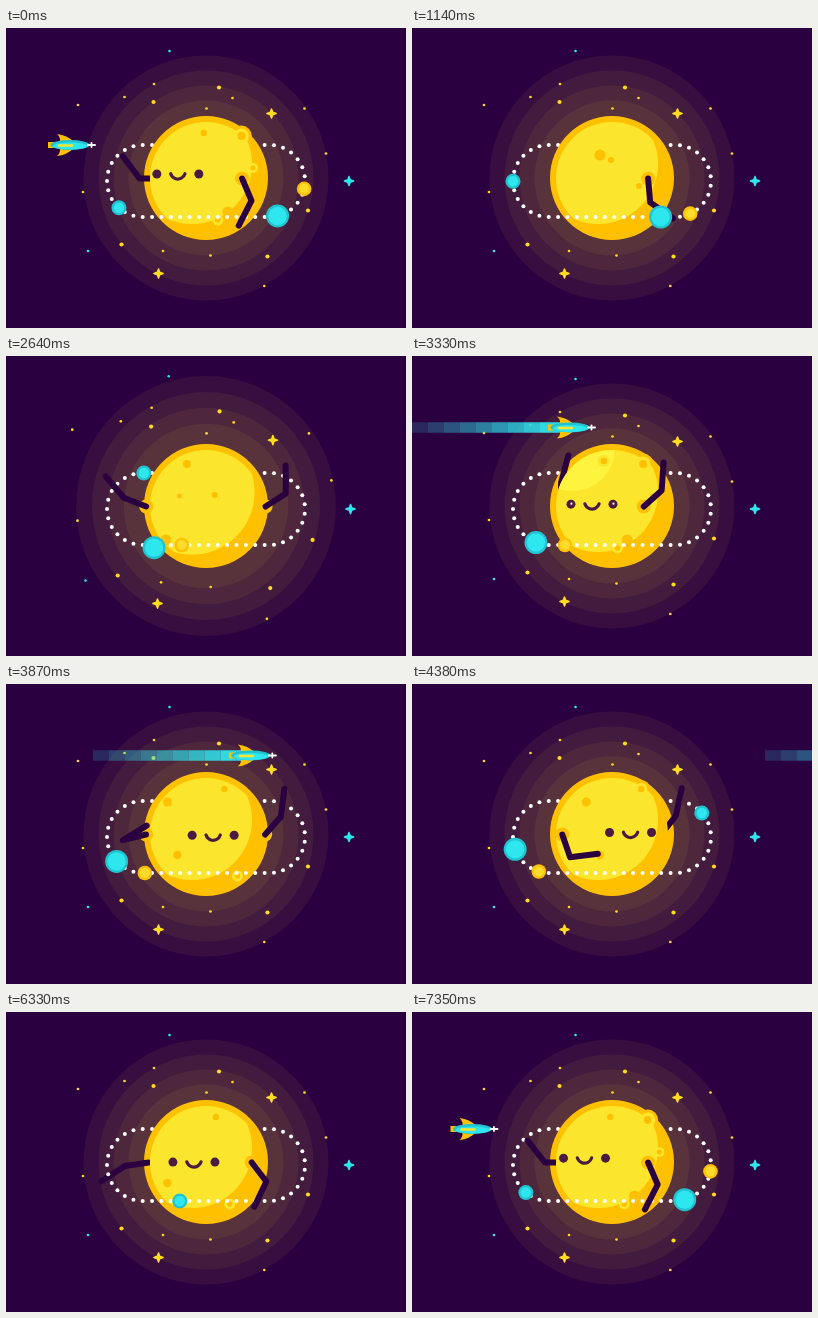
These frames come from a looping animation (400x300 px, 7380 ms). An HTML page with a canvas:

```html
<!DOCTYPE html>
<html>
<head>
<meta charset="utf-8">
<style>
html, body { margin: 0; height: 100%; overflow: hidden; background: #2b0040; }
canvas { display: block; }
</style>
</head>
<body>
<canvas id="stage" width="400" height="300"></canvas>
<script>
const g = document.getElementById('stage').getContext('2d');
const LOOP = 7380, TAU = Math.PI * 2, RAD = Math.PI / 180;
const NIGHT = '#2b0040', GOLD = '#ffc000', LEMON = '#fce62d', CYAN = '#2ee6ee', TEAL = '#22c3d0', INK = '#4b1c3f';
const BEATS = [0, 1140, 2070, 3330, 4380, 5310];

// Smooth monotone curve through [time, value] pairs
function curve(keys, t) {
  const n = keys.length;
  if (t <= keys[0][0]) return keys[0][1];
  if (t >= keys[n - 1][0]) return keys[n - 1][1];
  let i = 0;
  while (t >= keys[i + 1][0]) i++;
  const slope = j => (keys[j + 1][1] - keys[j][1]) / (keys[j + 1][0] - keys[j][0]);
  const tangent = j => {
    if (j === 0) return slope(0);
    if (j === n - 1) return slope(n - 2);
    const a = slope(j - 1), b = slope(j);
    return a * b > 0 ? 2 * a * b / (a + b) : 0;
  };
  const h = keys[i + 1][0] - keys[i][0], x = (t - keys[i][0]) / h;
  const a = keys[i][1], b = keys[i + 1][1];
  return a + (b - a) * x * x * (3 - 2 * x) + h * x * (1 - x) * (tangent(i) * (1 - x) - tangent(i + 1) * x);
}

// Cyclic version on the shared beats; gain is the growth over one loop
function beat(values, t, gain = 0) {
  const keys = values.map((v, i) => [BEATS[i], v]);
  keys.unshift([BEATS[5] - LOOP, values[5] - gain]);
  keys.push([LOOP, values[0] + gain], [LOOP + BEATS[1], values[1] + gain]);
  return curve(keys, t);
}

function disc(x, y, r, color) {
  g.fillStyle = color;
  g.beginPath();
  g.arc(x, y, r, 0, TAU);
  g.fill();
}

function line(points, width, color) {
  g.strokeStyle = color;
  g.lineWidth = width;
  g.lineCap = g.lineJoin = 'round';
  g.beginPath();
  points.forEach(p => g.lineTo(...p));
  g.stroke();
}

// The first five stars are the large ones
const STARS = [
  [115.5, 216.5], [147.5, 74], [213, 59.5], [302, 182.5], [261.5, 228.5],
  [72, 77], [118.5, 69], [148, 56], [226.5, 70], [200.5, 80.5], [298.5, 80.5],
  [320, 125.5], [258.3, 258], [204.5, 227.5], [157, 223], [77, 164]
];

function sparkle(x, y, color) {
  g.fillStyle = g.strokeStyle = color;
  g.lineWidth = 1.5;
  g.lineJoin = 'round';
  g.beginPath();
  for (let i = 0; i < 8; i++) {
    const r = i % 2 ? 1.7 : 4.6, a = i * TAU / 8;
    g.lineTo(x + r * Math.cos(a), y + r * Math.sin(a));
  }
  g.closePath();
  g.fill();
  g.stroke();
}

function sky(pulse) {
  g.fillStyle = NIGHT;
  g.fillRect(0, 0, 400, 300);
  for (let i = 0; i < 4; i++) disc(200, 150, (122.5 - 15 * i) * (1 + .115 * pulse), 'rgba(250,225,60,.06)');
  const spread = (x, y, k) => [200 + (x - 200) * (1 + k * pulse), 150 + (y - 150) * (1 + k * pulse)];
  STARS.forEach(([x, y], i) => disc(...spread(x, y, .085), i < 5 ? 2.1 : 1.35, '#ffd91f'));
  disc(...spread(163.5, 23, .04), 1.3, CYAN);
  disc(...spread(82, 223, .04), 1.3, CYAN);
  sparkle(...spread(265.5, 85.5, .04), '#ffdc1f');
  sparkle(...spread(152.5, 245.5, .04), '#ffdc1f');
  sparkle(...spread(343, 153, .02), CYAN);
}

// Orbit: a stadium, measured clockwise from its leftmost point
const R = 36, FLAT = 126, ARC = Math.PI * R, ROUND = 2 * (FLAT + ARC), COUNT = 51;
function orbit(s) {
  s = ((s % ROUND) + ROUND) % ROUND;
  const bend = (cx, a) => [cx + R * Math.cos(a), 153 + R * Math.sin(a)];
  if (s < ARC / 2) return bend(137, Math.PI + s / R);
  s -= ARC / 2;
  if (s < FLAT) return [137 + s, 117];
  s -= FLAT;
  if (s < ARC) return bend(263, s / R - Math.PI / 2);
  s -= ARC;
  if (s < FLAT) return [263 - s, 189];
  return bend(137, Math.PI / 2 + (s - FLAT) / R);
}

function orbitDots(front) {
  for (let i = 0; i < COUNT; i++) {
    const [x, y] = orbit(i * ROUND / COUNT);
    if (y > 153 === front) disc(x, y, 2, '#fff');
  }
}

const PLANETS = [
  { at: [247, 280, 357.6, 405.6, 432, 456], r: 7.3, rim: GOLD, fill: '#ffdc2b', sag: 0 },
  { at: [448, 478, 503, 590, 691, 780], r: 7.5, rim: TEAL, fill: CYAN, sag: 0 },
  { at: [287, 310, 384.6, 435, 465.6, 493.5], r: 11.5, rim: TEAL, fill: CYAN, sag: 5 }
];

function planet(p, t, front, pulse) {
  let [x, y] = orbit(beat(p.at, t, ROUND));
  if (y > 150 !== front) return;
  if (front) y += p.sag * pulse;
  disc(x, y, p.r, p.rim);
  disc(x, y, p.r - 2.3, p.fill);
}

// Rocket: one trip round the orbit, then a dash across the sky
const TURN = 173 + ARC;
function lap(u) {
  if (u < 173) return [90 + u, 117];
  if (u < TURN) return orbit(ARC / 2 + FLAT + u - 173);
  return [263 - (u - TURN), 188.5];
}
const dash = u => [u, 71.5];
const LAP = [[-880, -95], [0, 0], [1140, 150], [2070, 505], [2750, 800]];
const DASH = [[3000, -20], [3330, 184], [3780, 245], [4380, 537], [4620, 660]];

function trail(path, u, front, alpha) {
  for (let i = 0; i < 10; i++) {
    const far = u - 24 - (i + 1) * 16, a = alpha(i);
    if (a <= 0 || path === lap && far + 16 > 229 !== front) continue;
    g.globalAlpha = a;
    g.strokeStyle = '#2fdde6';
    g.lineWidth = 10.5;
    g.lineCap = 'butt';
    g.beginPath();
    for (let j = 0; j <= 4; j++) g.lineTo(...path(far + j * 4));
    g.stroke();
  }
  g.globalAlpha = 1;
}

function rocket(path, u) {
  const [x, y] = path(u), [bx, by] = path(u - 24);
  g.save();
  g.translate(x, y);
  g.rotate(Math.atan2(y - by, x - bx));
  g.fillStyle = GOLD;
  g.fillRect(-48, -3, 6, 6);
  for (const side of [-1, 1]) {
    g.beginPath();
    g.moveTo(-39, side * 11);
    g.quadraticCurveTo(-29, side * 10, -22, side * 3);
    g.lineTo(-37, 0);
    g.quadraticCurveTo(-34, side * 7, -39, side * 11);
    g.fill();
  }
  g.beginPath();
  g.fillStyle = TEAL;
  g.ellipse(-26, 0, 19.5, 5, 0, 0, TAU);
  g.fill();
  g.beginPath();
  g.fillStyle = CYAN;
  g.ellipse(-26, 1, 17, 3.5, 0, 0, TAU);
  g.fill();
  line([[-37, .5], [-24, .5]], 2.6, LEMON);
  line([[-8, 0], [-1, 0]], 2, '#fff');
  line([[-4.5, -2], [-4.5, 2]], 1.8, '#fff');
  g.restore();
}

function flight(t, front) {
  const time = t > 6000 ? t - LOOP : t;
  if (time < 2800) {
    const u = curve(LAP, time), power = Math.min(1, Math.max(0, (time - 1200) / 400));
    trail(lap, u, front, i => power * Math.min(.85, (8.5 - i) * .9));
    if (u - 20 > 229 === front) rocket(lap, u);
  } else if (front && time > 2990 && time < 4640) {
    const u = curve(DASH, time);
    trail(dash, u, true, i => Math.min(1, 1.08 - i * .1));
    rocket(dash, u);
  }
}

// Surface marks: longitude, height, pit radius; bumps have a bright mound round the pit
const CRATERS = [[-47, 118, 4.5], [53, 184, 5.5], [168, 127, 5.5], [179, 132, 3], [206, 158, 3], [112, 139, 3]];
const BUMPS = [[-30, 171, 4.2], [25, 105, 3.2], [79, 108, 4], [78, 140, 2.5], [43, 192, 2.8]];

function marks(list, yaw, paint) {
  for (const [lon, y, r] of list) {
    const a = (lon + yaw) * RAD;
    if (Math.cos(a) > .55) paint(200 + Math.sqrt(62 * 62 - (y - 150) ** 2) * Math.sin(a), y, r);
  }
}

function face(t) {
  const turn = beat([-28, -180, -152, -19.5, 18, 0], t), a = turn * RAD;
  if (Math.cos(a) < 0) return;
  g.save();
  g.beginPath();
  g.arc(200, 150, 62, 0, TAU);
  g.clip();
  g.translate(200 + 60 * Math.sin(a), 153 - .25 * Math.abs(turn));
  g.scale(Math.min(1, Math.cos(a) / .8), 1);
  for (const dx of [-21, 21]) {
    disc(dx, 0, 4.5, INK);
    if (t > 2800 && t < 3800) disc(dx + .5, -.5, 1.1, '#fff');
  }
  g.strokeStyle = INK;
  g.lineWidth = 3.2;
  g.lineCap = 'round';
  g.beginPath();
  g.arc(0, -2.5, 7.5, .3, Math.PI - .3);
  g.stroke();
  g.restore();
}

// Arms: longitude of the shoulder, then directions of upper and lower arm, in degrees
const ARMS = [
  { shoulder: [-135, -165, -58, -122, -56, -80], upper: [180, 180, 150, 270, 71, 152], lower: [233, 270, 204, 285, 353, 86] },
  { shoulder: [37, 37, 122, 32, 125, 76], upper: [67, 85, -20, -42, -52, 32], lower: [117, 35, -92, -86, -78, 111] }
];

function arm({ shoulder, upper, lower }, t, front) {
  const lon = beat(shoulder, t) * RAD;
  if (Math.cos(lon) > 0 !== front) return;
  const reach = ([x, y], length, angles) => {
    const a = beat(angles, t) * RAD;
    return [x + length * Math.cos(a), y + length * Math.sin(a)];
  };
  const root = [200 + 60 * Math.sin(lon), 150.5];
  const elbow = reach(root, 24, upper);
  if (front) disc(...root, 7, GOLD);
  line([root, elbow, reach(elbow, 28, lower)], 6, NIGHT);
}

function sun(t, pulse) {
  const yaw = beat([-28, -180, -152, -36, 18, 0], t);
  disc(200, 150, 62, GOLD);
  for (const a of ARMS) arm(a, t, false);
  marks(BUMPS, yaw, (x, y, r) => disc(x, y, r * 1.6 + 4, GOLD));
  disc(200, 150, 56, GOLD);

  g.save();
  g.beginPath();
  g.arc(200, 150, 56, 0, TAU);
  g.clip();
  disc(186, 136, 60 + 5 * pulse, LEMON);
  const shine = Math.max(0, 1 - ((t - 3330) / 420) ** 2);
  disc(160, 92, 43, `rgba(255,250,70,${.7 * shine})`);
  g.restore();

  marks(BUMPS, yaw, (x, y, r) => disc(x, y, r * 1.6 + 1, LEMON));
  marks([...CRATERS, ...BUMPS], yaw, (x, y, r) => disc(x, y, r, GOLD));
  face(t);
}

function draw(now) {
  const t = now % LOOP;
  const pulse = curve([[1520, 0], [2040, 1], [2180, 1], [2980, 0]], t);
  const [orange, small, big] = PLANETS;
  sky(pulse);
  orbitDots(false);
  flight(t, false);
  for (const p of PLANETS) planet(p, t, false, pulse);
  sun(t, pulse);
  orbitDots(true);
  for (const a of ARMS) arm(a, t, true);
  planet(orange, t, true, pulse);
  planet(small, t, true, pulse);
  flight(t, true);
  planet(big, t, true, pulse);
}

let start;
function tick(now) {
  start ??= now;
  draw(now - start);
  requestAnimationFrame(tick);
}
draw(0);
requestAnimationFrame(tick);
</script>
</body>
</html>
```
